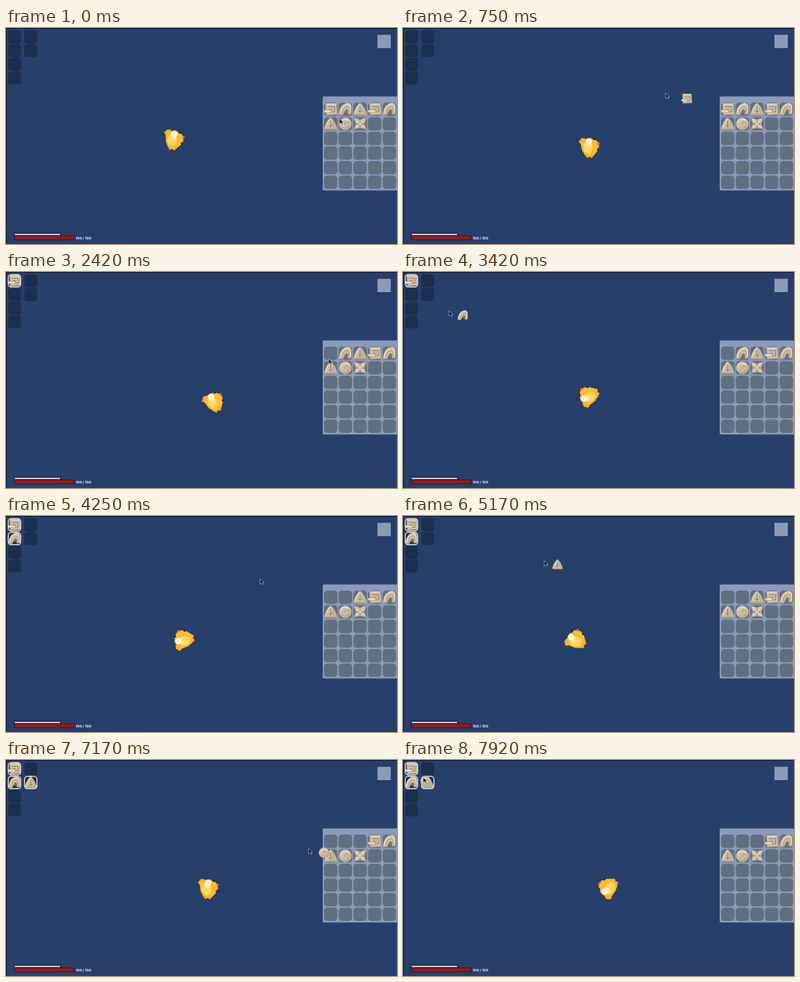
Write an HTML page with a canvas that moves like this. It is 600 by 333 pixels and loops after 8 s.

```html
<!DOCTYPE html>
<html lang="en">
<head>
<meta charset="utf-8">
<style>
  html, body { margin: 0; width: 100%; height: 100%; overflow: hidden; background: #273f6b; }
  canvas { display: block; width: 100%; height: 100%; }
</style>
</head>
<body>
<canvas id="stage" width="600" height="333"></canvas>
<script>
const LOOP = 8000;
const ctx = document.getElementById('stage').getContext('2d');

const inventory = ['tablet', 'arch', 'spear', 'tablet', 'arch', 'spear', 'disc', 'cross'];
const cellAt = i => [498.3 + (i % 5) * 22.5, 125.3 + Math.floor(i / 5) * 22.5];
// Four slots in the left column, two in the right one
const slotAt = i => [i < 4 ? 13 : 38, 13.5 + (i % 4) * 21.2];

// Each trip carries one item to a slot; via and hover are [time, x, y] on the way there and back
const trips = [
  { item: 0, slot: 0, pick: 520, drop: 1780, via: [1330, 30, 28], hover: [2420, 495, 136] },
  { item: 1, slot: 1, pick: 2880, drop: 3800, via: [3420, 71, 62] },
  { item: 2, slot: 5, pick: 4500, drop: 5800, via: [5170, 217, 71], hover: [6420, 555, 133] },
  { item: 6, slot: 4, pick: 7000, drop: 8300, via: [7920, 31, 29] }
];
const cursorPath = [[0, 512, 142], ...trips.flatMap(t => [
  [t.pick, ...cellAt(t.item)], t.via, [t.drop, ...slotAt(t.slot)], ...(t.hover ? [t.hover] : [])
])];
const birdPath = [
  [0, 258, 171], [1330, 310, 193], [2420, 319, 199], [3420, 284, 191],
  [5170, 265, 190], [6420, 304, 197], [LOOP, 314, 197]
];

// Monotone cubic interpolation: smooth, without overshoot
function sample(path, time) {
  const t = Math.max(0, time);
  let i = 0;
  while (i < path.length - 2 && t > path[i + 1][0]) i++;
  const h = path[i + 1][0] - path[i][0];
  const s = Math.min(1, (t - path[i][0]) / h);
  return [1, 2].map(axis => {
    const slope = k => path[k + 1] && path[k]
      ? (path[k + 1][axis] - path[k][axis]) / (path[k + 1][0] - path[k][0]) : 0;
    const tangent = k => {
      const a = slope(k - 1), b = slope(k);
      return a * b > 0 ? 2 * a * b / (a + b) : 0;
    };
    const from = path[i][axis], to = path[i + 1][axis];
    const ease = s * s * (3 - 2 * s);
    return from + (to - from) * ease +
      h * s * (1 - s) * ((1 - s) * tangent(i) - s * tangent(i + 1));
  });
}

function box(x, y, w, h, r, color) {
  ctx.fillStyle = color;
  ctx.beginPath();
  ctx.roundRect(x, y, w, h, r);
  ctx.fill();
}

function shape(d, fill, stroke, width = 1) {
  const path = new Path2D(d);
  if (fill) { ctx.fillStyle = fill; ctx.fill(path); }
  if (stroke) { ctx.strokeStyle = stroke; ctx.lineWidth = width; ctx.stroke(path); }
}

function oval(x, y, rx, ry, color, turn = 0) {
  ctx.fillStyle = color;
  ctx.beginPath();
  ctx.ellipse(x, y, rx, ry, turn, 0, Math.PI * 2);
  ctx.fill();
}

function place(x, y, scale, turn, draw) {
  ctx.save();
  ctx.translate(x, y);
  ctx.rotate(turn);
  ctx.scale(scale, scale);
  draw();
  ctx.restore();
}

const STONE = '#cfbea3', LIGHT = '#e6dac4', SHADE = '#a8967d', DARK = '#85755f';

const icons = {
  tablet() {
    shape('M-8-9H9L10 8L-7 9Z', STONE, SHADE, .8);
    shape('M-7-8H8', null, LIGHT, 1.6);
    shape('M-4-4H6V4H-1M-3 0H3', null, DARK);
    shape('M-10 1H1V5H-10Z', LIGHT, SHADE, .7);
  },
  arch() {
    shape('M-10 8Q-8-9 4-10Q9-9 9-4V7L4 8V2Q1-2-1 3L-4 9Z', STONE, SHADE, .8);
    shape('M-8 7Q-7-7 4-8Q8-8 8-3V5', null, LIGHT, 1.5);
    shape('M-5 7Q-4-4 3-4Q6-4 6 5', null, SHADE);
    shape('M-1 5Q0-1 3 0V6Z', DARK);
  },
  spear() {
    shape('M0-10Q7-4 10 8L7 9H-7L-10 8Q-7-4 0-10Z', STONE, SHADE, .8);
    shape('M-1-8Q-6-2-8 6', null, LIGHT, 1.4);
    shape('M0-5V6M-3 3H3', null, DARK);
    shape('M3-3L6 6M-7 7H7', null, SHADE);
  },
  disc() {
    oval(0, 0, 10, 10, SHADE);
    oval(-.2, -.3, 9.3, 9.3, STONE);
    shape('M-7-1A7 7 0 0 1 5-5', null, LIGHT, 1.6);
    shape('M-5 4A6 6 0 0 0 6 0Q4-4 0-2Q-2 1 1 2M4 7L3 4', null, SHADE, 1.1);
  },
  cross() {
    shape('M-9-9L-4-8L0-6L4-8L9-9L8-4L6 0L8 4L9 8L4 7L0 6L-4 7L-9 8L-8 4L-6 0L-8-4Z', STONE, SHADE, .8);
    shape('M-7-7L6 6M6-7L-6 6', null, LIGHT, 1.3);
    shape('M0-5V-2M0 2V5M-5 0H-2M2 0H5', null, DARK, 1.2);
  }
};

function drawItem(name, [x, y], scale = 1) {
  place(x, y, scale, 0, icons[name]);
}

function drawBird(x, y, angle) {
  place(x, y, 1, angle, () => {
    shape('M-3-14L-8-16L-14-12L-13-9L-9-6Z', '#f9ab25');
    shape('M-12 8L-9 16L-5 15L-2 18L5 13L8 9Z', '#f9ab25');
    shape('M-12-9L-5-13L3-13L10-9L14-3V4L10 10L3 14L-5 14L-11 9L-13 3Z', '#ffba2e');
    oval(-3, 1, 7, 9.5, '#ffd863', .1);
    oval(-1, -4, 5, 4, '#ffe9a8');
    oval(1, -7.5, 4.8, 4.3, '#fffaf0', .4);
    shape('M0-9L3-7', null, '#b9b6b4', .8);
    shape('M8-11L12-9L11-7L8-8ZM9 8L12 6L12 9L10 11Z', '#1c2434');
    shape('M13-4L17-1L13 3Z', '#dd7038');
  });
}

function drawCursor([x, y]) {
  place(x, y - 2, 1, 0, () =>
    shape('M0 0V8L2 6.2L3.5 9L5 8.2L3.6 5.6H6Z', '#10131a', '#d5dae4', .6));
}

function drawHud() {
  box(570, 10.5, 20.5, 20.5, 0, '#8c9bb7');
  box(12, 315.5, 73, 5.5, 1, '#1b2b49');
  box(13.5, 317.3, 69.5, 2, 0, '#d9dde4');
  box(12, 320, 93, 7, 1, '#1b2538');
  box(13.5, 321, 90, 5, 0, '#9f141a');
  ctx.fillStyle = '#f2f4f8';
  ctx.font = 'bold 5.4px Inter, sans-serif';
  ctx.fillText('100 / 100', 107, 325.5);
}

function drawInventory(time) {
  box(486, 105.5, 120, 145, 2, '#8a9bb9');
  for (let i = 0; i < 30; i++) {
    const [x, y] = cellAt(i);
    box(x - 10.3, y - 10.3, 20.6, 20.6, 5, '#616f82');
    const taken = trips.some(t => t.item === i && time >= t.drop);
    if (inventory[i] && !taken) drawItem(inventory[i], [x, y]);
  }
}

function drawEquipment(time) {
  for (let i = 0; i < 6; i++) {
    const [x, y] = slotAt(i);
    box(x - 10, y - 10, 20, 20, 4.5, '#1d2f50');
    const trip = trips.find(t => t.slot === i && time >= t.drop);
    if (!trip) continue;
    drawItem(inventory[trip.item], [x, y], .92);
    ctx.strokeStyle = '#efe9df';
    ctx.lineWidth = 1.4;
    ctx.beginPath();
    ctx.roundRect(x - 9.5, y - 9.5, 19, 19, 4.5);
    ctx.stroke();
  }
}

function render(time) {
  box(0, 0, 600, 333, 0, '#273f6b');
  box(0, 0, 600, 1, 0, '#0c1424');
  box(0, 0, 1, 333, 0, '#0c1424');

  const [bx, by] = sample(birdPath, time);
  const [aimX, aimY] = sample(cursorPath, time - 160);
  drawBird(bx, by, Math.atan2(aimY - by, aimX - bx));

  drawHud();
  drawInventory(time);
  drawEquipment(time);

  // The carried item trails slightly behind the pointer
  const trip = trips.find(t => time >= t.pick && time < t.drop);
  if (trip) drawItem(inventory[trip.item], sample(cursorPath, time - 50), .8);
  drawCursor(sample(cursorPath, time));
}

function tick() {
  render(performance.now() % LOOP);
  requestAnimationFrame(tick);
}
tick();
</script>
</body>
</html>
```
